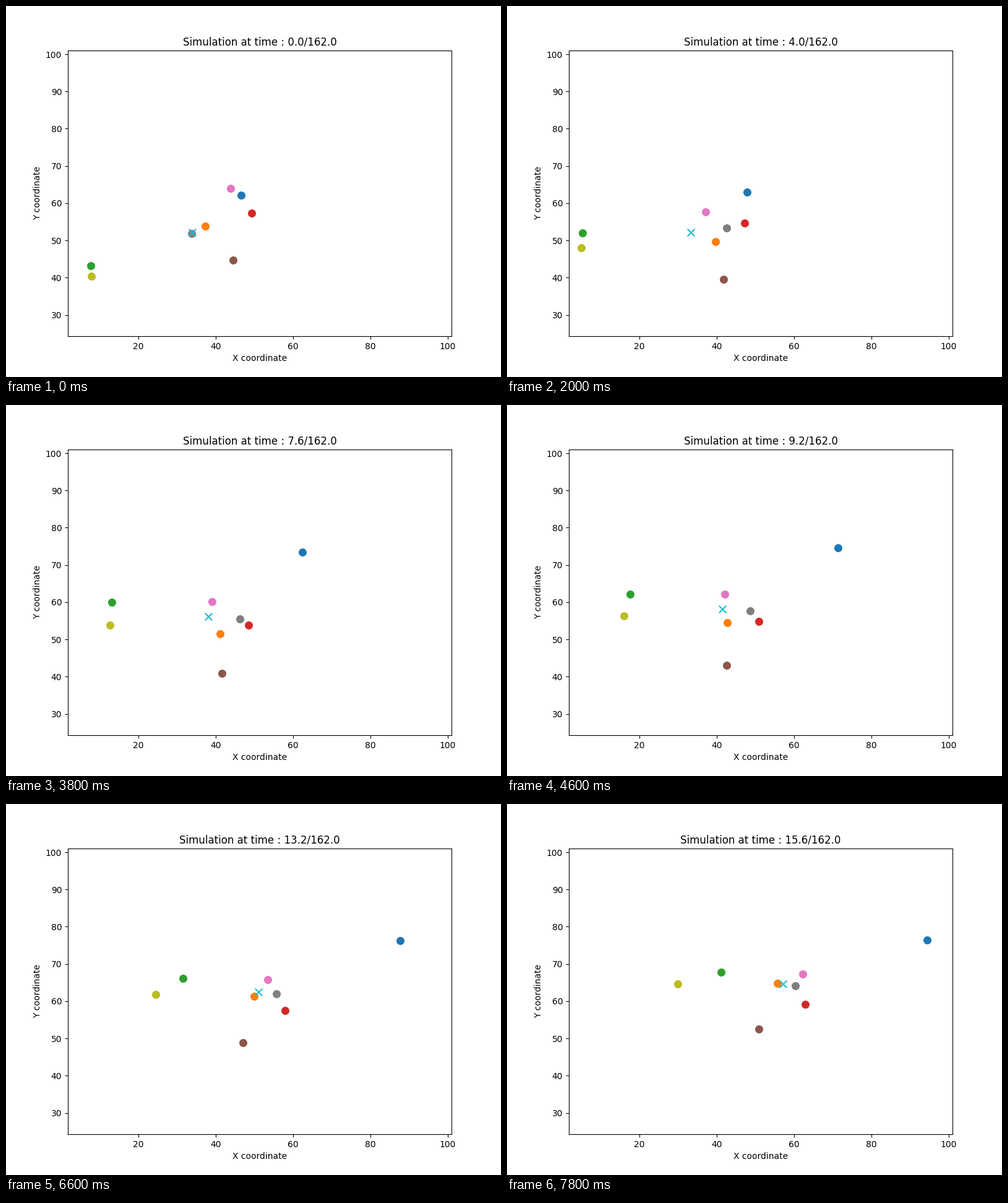
A matplotlib script for the animation above (8000 ms loop, 800 by 600 pixels).

```python
import numpy as np
import matplotlib.pyplot as plt
from matplotlib.animation import FuncAnimation

FRAMES, INTERVAL = 40, 200
STEP, TOTAL = 0.4, 162.0
XLIM, YLIM = (1.76, 101.0), (24.285, 101.0)
SIZE = 70

# Each dot glides through a few key points, given in stage pixels.
KEY_STEPS = np.array([0, 5, 14, 28, 39])
ROUTES = {
    "C0": [(380, 306), (366, 338), (422, 260), (596, 225), (679, 220)],
    "C1": [(322, 356), (335, 371), (338, 383), (374, 329), (437, 290)],
    "C2": [(137, 420), (112, 399), (143, 341), (239, 293), (346, 272)],
    "C3": [(397, 335), (392, 341), (382, 357), (428, 342), (482, 324)],
    "C5": [(367, 411), (357, 432), (347, 443), (366, 403), (407, 364)],
    "C6": [(363, 295), (333, 328), (321, 328), (383, 293), (478, 275)],
    "C7": [(300, 368), (339, 360), (362, 357), (414, 318), (466, 294)],
    "C8": [(138, 437), (106, 411), (144, 376), (215, 323), (276, 291)],
}


def glide(points, n):
    """Position at step n on a cubic Hermite curve through the key points."""
    p = np.array(points, float)
    m = np.gradient(p, KEY_STEPS, axis=0)
    i = min(np.searchsorted(KEY_STEPS, n, side="right"), len(p) - 1) - 1
    h = KEY_STEPS[i + 1] - KEY_STEPS[i]
    u = (n - KEY_STEPS[i]) / h
    ease = u * u * (3 - 2 * u)
    bend = u * (1 - u) * h * ((1 - u) * m[i] - u * m[i + 1])
    return p[i] + ease * (p[i + 1] - p[i]) + bend


fig, ax = plt.subplots(figsize=(8, 6), dpi=100)
ax.set(xlim=XLIM, ylim=YLIM, xlabel="X coordinate", ylabel="Y coordinate")
ax.set_xticks(range(20, 101, 20))
ax.set_yticks(range(30, 101, 10))
title = ax.set_title("")
dots = [ax.scatter(0, 0, s=SIZE, color=c) for c in ROUTES]
cross = ax.scatter(0, 0, s=SIZE, color="C9", marker="x")


def to_data(pixels):
    flipped = [0, fig.bbox.height] + pixels * [1, -1]
    return ax.transData.inverted().transform(flipped)


def update(n):
    spots = to_data(np.array([glide(r, n) for r in ROUTES.values()]))
    for dot, spot in zip(dots, spots):
        dot.set_offsets(spot)
    cross.set_offsets(spots.mean(axis=0))
    title.set_text(f"Simulation at time : {n * STEP:.1f}/{TOTAL}")
    return [*dots, cross, title]


anim = FuncAnimation(fig, update, frames=FRAMES, interval=INTERVAL,
                     repeat=True, repeat_delay=0, blit=False)
plt.show()
```
